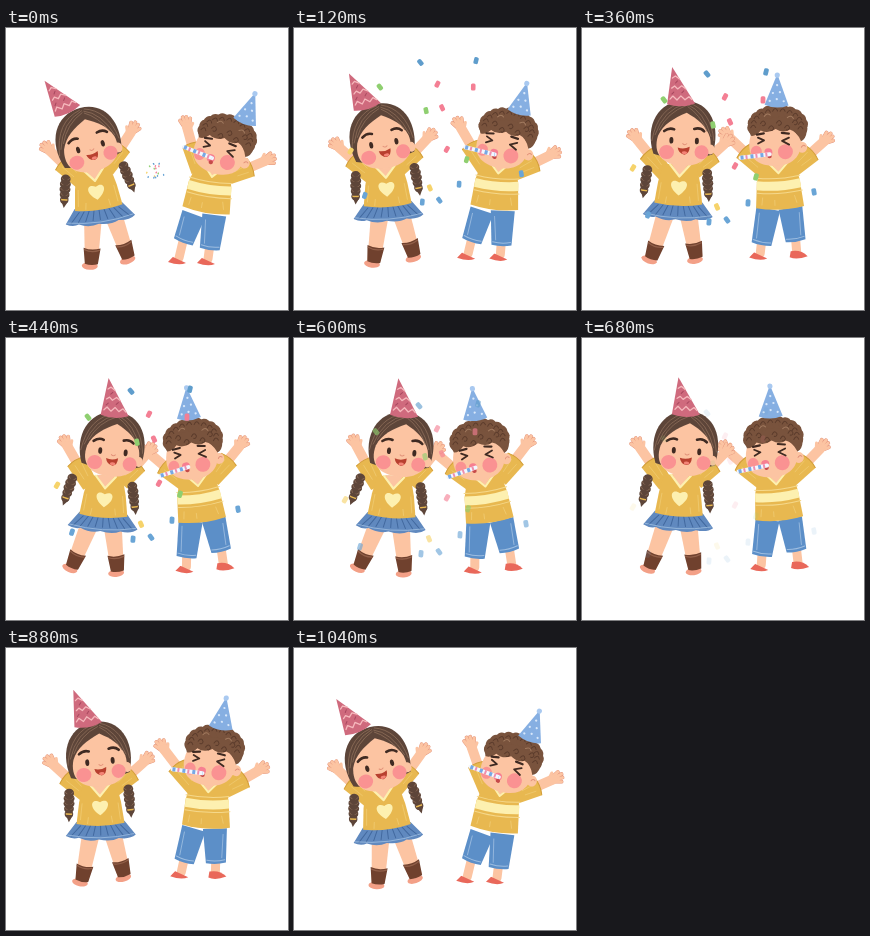
These frames come from a looping animation (282x282 px, 1080 ms). An HTML page:

```html
<!DOCTYPE html>
<html lang="en">
<head>
<meta charset="utf-8">
<title>Party dance</title>
<style>
html, body { margin: 0; width: 100%; height: 100%; overflow: hidden; background: #fff; }
svg { display: block; width: 100vw; height: 100vh; }
</style>
</head>
<body>
<svg id="stage" viewBox="0 0 282 282" fill="none" stroke-linecap="round" stroke-linejoin="round"></svg>
<script>
const LOOP = 1080, STEP = 40;
const C = {
  skin: '#fcc4a2', line: '#e2927a', cheek: '#fa9292', shirt: '#e8b850', fold: '#d29d38', cream: '#fdf0b0',
  girlHair: '#5d4539', strand: '#8b6c58', dark: '#3f2a22', boyHair: '#79533d', curl: '#5c3c2c',
  skirt: '#6089bf', pleat: '#42699f', hem: '#9dbde0', sock: '#70412e', shorts: '#5c8fc8',
  shoe: '#e9685a', pinkHat: '#cf6a7d', blueHat: '#86afe2'
};
const stage = document.getElementById('stage');
let sway = 0;

// Blends the left, middle and right poses with a parabola.
const pose = (a, b, c) => a.map((v, i) =>
  v * (1 - sway) * (1 - 2 * sway) + b[i] * 4 * sway * (1 - sway) + c[i] * sway * (2 * sway - 1));
const place = ([x, y, r = 0], body) =>
  `<g transform="translate(${x.toFixed(2)} ${y.toFixed(2)}) rotate(${r.toFixed(2)})">${body}</g>`;
const fill = (d, color) => `<path d="${d}" fill="${color}"/>`;
const line = (d, color, w = 1, extra = '') => `<path d="${d}" stroke="${color}" stroke-width="${w}" ${extra}/>`;
const oval = (x, y, rx, ry, color) => `<ellipse cx="${x}" cy="${y}" rx="${rx}" ry="${ry}" fill="${color}"/>`;
const seg = (x1, y1, x2, y2) => `M${x1} ${y1}L${x2} ${y2}`;
const angle = (dx, dy) => Math.atan2(dx, -dy) * 180 / Math.PI;
const butt = 'stroke-linecap="butt"';

function hand(x, y, r, side) {
  const fingers = 'M-3 -2L-5 -8M-1 -3L-1.6 -10.5M1.4 -3L2 -10M3 -2L5.4 -7.5';
  return place([x, y, r],
    line(fingers, C.line, 3.8) + line(fingers, C.skin, 3) + oval(0, 0, 4.7, 5, C.skin) +
    line(`M${side * 3} 2L${side * 6.5} -2`, C.skin, 3));
}

function arm([sx, sy, hx, hy], side) {
  const dx = hx - sx, dy = hy - sy;
  const len = Math.hypot(dx, dy), cut = len * .56;
  return hand(hx, hy, angle(dx, dy), side) + place([sx, sy, angle(dx, dy)],
    line(seg(0, 0, 0, -len), C.skin, 10) +
    fill(`M-8 5L-10 ${-cut}Q0 ${-cut - 3} 10 ${-cut}L8 5Z`, C.shirt) +
    line(`M-9.5 ${-cut}Q0 ${-cut - 3} 9.5 ${-cut}`, C.fold, 1) +
    line(`M-3 ${-cut + 3}L-2 -4M4 ${-cut + 4}L3 -5`, '#f0cb72', .7));
}

function girlLeg([hx, hy, ax, ay]) {
  const dx = hx - ax, dy = hy - ay, len = Math.hypot(dx, dy);
  return place([ax, ay, angle(dx, dy)],
    oval(-1, 5, 8, 3.8, '#f3a087') +
    fill(`M-6 2L-9 ${-len}H9L7 2Z`, C.skin) +
    fill('M-6 3L-8 -13Q0 -10 9 -13L7 3Q0 5 -6 3Z', C.sock) +
    line('M-7 -11Q0 -8 8 -11', '#92604a', 1.2));
}

function boyLeg([hx, hy, kx, ky, ax, ay], side) {
  const dx = hx - kx, dy = hy - ky, len = Math.hypot(dx, dy);
  return line(seg(kx, ky - 3, ax, ay), C.skin, 9) +
    fill(`M${ax - 6} ${ay - 1}Q${ax + side * 4} ${ay - 3} ${ax + side * 11} ${ay + 4}Q${ax} ${ay + 8} ${ax - side * 7} ${ay + 5}Z`, C.shoe) +
    place([kx, ky, angle(dx, dy)],
      fill(`M-10 2L-12 ${-len - 2}H12L10 2Q0 4 -10 2Z`, C.shorts) +
      line('M-9 -1Q0 1 9 -1', C.hem, 1) +
      line(`M${side * 6} -3L${side * 8} ${-len + 4}`, C.hem, .8));
}

function hat(p, color, tipX, tipY, half, pattern) {
  return place(p, fill(`M${-half} 1L${tipX} ${tipY}L${half} 1Q0 6 ${-half} 1Z`, color) + pattern);
}

function braid(p) {
  let s = '';
  for (let i = 0; i < 5; i++) {
    const y = 4 + i * 5.2, w = 5.8 - Math.abs(i - 1.5) * .6;
    s += oval(0, y, w, 4.4, C.girlHair) + line(`M${-w + 1} ${y - 1}Q0 ${y + 5} ${w - 1} ${y - 1}`, C.strand, .8);
  }
  return place(p, s + line('M-2.5 25H2.5', C.shirt, 1.5) + fill('M-3 26L0 33L4 26Z', C.girlHair));
}

function girlTorso() {
  let pleats = '';
  for (let i = -4; i <= 4; i++) pleats += seg(i * 5, 36, i * 7.4, 46);
  return fill('M-24 32L-35 46Q-28 50 -22 48Q-12 53 -2 50Q10 53 18 49Q29 51 35 46L24 32Z', C.skirt) +
    line(pleats, C.pleat, 1) + line('M-33 45Q0 52 33 45', C.hem, .8) +
    fill('M-17 -4Q0 -8 17 -4L21 13L24 34Q0 39 -24 34L-21 13Z', C.shirt) +
    line('M-18 14L-20 30M18 14L20 30M-12 28L-13 34M11 27L12 33', '#f0cb72', .8) +
    fill('M-9 -6L0 7L9 -6Z', C.skin) + line('M-10 -5L0 7L10 -5', C.cream, 2.2) +
    fill('M0 26C-13 17 -8 8 0 13C8 8 13 17 0 26Z', C.cream);
}

function girlHead() {
  const strands = 'M2 -36Q-20 -30 -28 -4M2 -34Q-16 -27 -24 -9M4 -35Q20 -29 28 -4M4 -33Q16 -26 24 -9M0 -37Q-26 -32 -31 2M5 -37Q27 -30 31 0';
  return fill('M-29 15C-39 -14 -25 -39 1 -39C27 -39 38 -14 30 14Q0 24 -29 15Z', C.girlHair) +
    oval(28, 9, 4, 5, C.skin) +
    fill('M-25 -3C-30 15 -20 26 1 26C21 26 31 14 27 -3C23 -15 14 -21 3 -27C-10 -21 -20 -15 -25 -3Z', C.skin) +
    line(strands, C.strand, .8) +
    line('M-19 -8Q-14 -12 -9 -10M11 -11Q17 -13 21 -9', C.dark, 2.6) +
    oval(-16, 13, 7.5, 7, C.cheek) + oval(19, 12, 7, 7, C.cheek) +
    oval(-11.5, 1, 2, 3.3, C.dark) + oval(14, 1, 2, 3.3, C.dark) +
    line('M0 4Q2 6 4 4', C.line, 1) +
    fill('M-5 8Q1 10 7 7Q7 14 2 15Q-4 14 -5 8Z', '#b8402f') + oval(2, 13, 2.7, 1.5, '#f48476');
}

function girl() {
  return girlLeg(pose([87, 188, 85, 233], [85, 183, 74, 229], [83, 188, 66, 226])) +
    girlLeg(pose([107, 186, 121, 227], [106, 183, 116, 225], [107, 190, 110, 231])) +
    arm(pose([72, 150, 44, 123], [78, 143, 49, 115], [82, 144, 63, 107]), 1) +
    arm(pose([103, 138, 125, 104], [112, 139, 140, 115], [119, 142, 141, 114]), -1) +
    place(pose([88, 146, -8], [95, 141, 0], [100, 144, 4]), girlTorso()) +
    braid(pose([60, 147, 4], [64, 140, 2], [68, 136, 22])) +
    braid(pose([116, 134, -22], [123, 138, -4], [126, 145, -8])) +
    place(pose([83, 118, -15], [95, 112, -3], [107, 113, 6]), girlHead()) +
    hat(pose([61, 82, -25], [87, 75, -8], [111, 77, 4]), C.pinkHat, -8, -36, 14,
      line('M-11 -4L-8 -7L-4 -3L0 -7L4 -3L8 -6L11 -3M-9 -15L-6 -17L-3 -14L1 -17L5 -14M-8 -25L-5 -27L-1 -24', '#f6b9bd', 1.3) +
      line('M-9 -9L-7 -11M1 -10L3 -12M-5 -20L-3 -22', '#a8485f', 1));
}

function boyTorso() {
  return fill('M-17 -4Q0 -8 17 -4L21 14L24 40Q0 45 -24 40L-22 14Z', C.shirt) +
    fill('M-22 13Q0 16 21 12L22 21Q0 25 -22.5 22Z', C.cream) +
    line('M-22 10Q0 13 21 9M-22 25Q0 28 23 24', '#f5d88a', 1) +
    line('M-17 30L-18 37M15 29L17 36M-5 33L-5 38', '#f0cb72', .8) +
    fill('M-9 -6L0 5L9 -6Z', C.skin) + line('M-10 -5L0 6L10 -5', C.cream, 2);
}

function boyHead() {
  let curls = '', shine = '';
  for (let i = 0; i <= 11; i++) {
    const a = Math.PI * (.98 + i * .1), x = 4 + 24 * Math.cos(a), y = -17 + 15 * Math.sin(a);
    curls += oval(x, y, 6.5, 6.5, C.boyHair);
    shine += `M${x - 3} ${y}q3 -5 5 0`;
  }
  for (let i = 0; i < 5; i++) shine += `M${-13 + i * 8} ${-20 + i % 2 * 5}q3 -5 5 0q-1 3 -3 2`;
  return oval(28, 5, 5, 5.5, C.skin) + line('M27 5Q29 2 31 4', C.line, 1) +
    fill('M-23 -9C-29 10 -21 22 0 23C20 23 29 12 27 -8Q2 -25 -23 -9Z', C.skin) +
    fill('M-25 -13Q-20 -33 4 -33Q32 -31 33 -11Q32 -3 27 -1Q23 -11 16 -13Q10 -9 2 -14Q-6 -9 -13 -13Q-18 -7 -23 -8Z', C.boyHair) +
    curls + line(shine, C.curl, 1) + line('M-9 -27q3 -4 6 -1M14 -25q4 -3 6 1', '#a17a5f', 1) +
    line('M-17 -9L-10 -10M8 -10L15 -9', C.dark, 2.2) +
    oval(-18, 8, 5.5, 6, C.cheek) + oval(11, 9, 7.5, 7.5, C.cheek) +
    line('M-16 -6L-10 -3L-16 0M15 -5L8 -2L15 2', C.dark, 1.8) +
    oval(-6, 9, 4, 4, '#f77f91') + oval(-5, 13, 2.2, 2, '#c64a4a');
}

function whistle([x1, y1, x2, y2]) {
  const d = seg(x1, y1, x2, y2);
  return line(d, '#f3f7ff', 4) + line(d, '#77a8e4', 4, butt + ' stroke-dasharray="3 7"') +
    line(d, '#ee8fae', 4, butt + ' stroke-dasharray="2 8" stroke-dashoffset="-5"');
}

function boy() {
  return boyLeg(pose([187, 188, 178, 212, 173, 230], [187, 182, 179, 212, 176, 224], [184, 186, 181, 218, 181, 230]), -1) +
    boyLeg(pose([208, 189, 204, 219, 202, 231], [209, 182, 211, 212, 211, 224], [208, 184, 215, 211, 218, 227]), sway < .3 ? -1 : 1) +
    arm(pose([192, 139, 181, 99], [185, 139, 154, 103], [174, 143, 144, 118]), 1) +
    arm(pose([226, 147, 259, 133], [219, 140, 250, 120], [208, 138, 231, 107]), -1) +
    place(pose([207, 143, 10], [201, 138, 2], [190, 143, -8]), boyTorso()) +
    place(pose([213, 123, 15], [200, 114, 4], [183, 120, -8]), boyHead()) +
    whistle(pose([178, 119, 206, 130], [164, 123, 194, 125], [154, 140, 181, 130])) +
    hat(pose([239, 93, 20], [209, 77, 8], [180, 80, -6]), C.blueHat, 0, -30, 12,
      line('M-7 -3h.1M0 -5h.1M7 -3h.1M-4 -11h.1M3 -12h.1M0 -19h.1', '#d7e7fa', 2.2) +
      oval(0, -29, 2.6, 2.6, '#a9c9f0'));
}

// x, y at 240 ms, then colour
const confetti = [
  [125, 35, '#5f9dcc'], [143, 58, '#f47f94'], [184, 33, '#5f9dcc'], [181, 61, '#f47f94'],
  [131, 86, '#8fcf70'], [148, 83, '#f47f94'], [82, 61, '#8fcf70'], [153, 127, '#f47f94'],
  [174, 138, '#8fcf70'], [166, 164, '#6aa5d6'], [232, 153, '#6aa5d6'], [135, 168, '#f6d36b'],
  [145, 181, '#6aa5d6'], [51, 129, '#f6d36b'], [66, 176, '#6aa5d6'], [127, 183, '#6aa5d6']
];

function burst(t) {
  const u = Math.min(1, (t + 8) / 168), out = 1 - (1 - u) ** 2;
  const fade = Math.max(0, Math.min(1, (700 - t) / 160));
  if (!fade) return '';
  const fall = (Math.max(t, 160) - 240) * .091;
  return `<g opacity="${fade}">` + confetti.map(([x, y, color], i) => {
    const s = .2 + .8 * out;
    return place([150 + (x - 150) * out, 147 + (y + fall - 147) * out, i * 67 % 80 - 40],
      `<rect x="${-2.4 * s}" y="${-3.6 * s}" width="${4.8 * s}" height="${7.2 * s}" rx="${1.6 * s}" fill="${color}"/>`);
  }).join('') + '</g>';
}

const swayKeys = [[0, 0], [.074, .05], [.37, .4], [.444, .5], [.593, .645], [.815, .95], [.889, .98], [1, 1]];
function swayAt(t) {
  const u = 1 - Math.abs(1 - 2 * t / LOOP);
  const i = Math.max(1, swayKeys.findIndex(k => k[0] >= u));
  const [u0, v0] = swayKeys[i - 1], [u1, v1] = swayKeys[i];
  return v0 + (v1 - v0) * (u - u0) / (u1 - u0);
}

let shown = -1;
function render(t) {
  if (t === shown) return;
  shown = t;
  sway = swayAt(t);
  stage.innerHTML = boy() + girl() + burst(t);
}

const start = performance.now();
function tick() {
  render(Math.floor((performance.now() - start) % LOOP / STEP) * STEP);
  requestAnimationFrame(tick);
}
tick();
</script>
</body>
</html>
```
